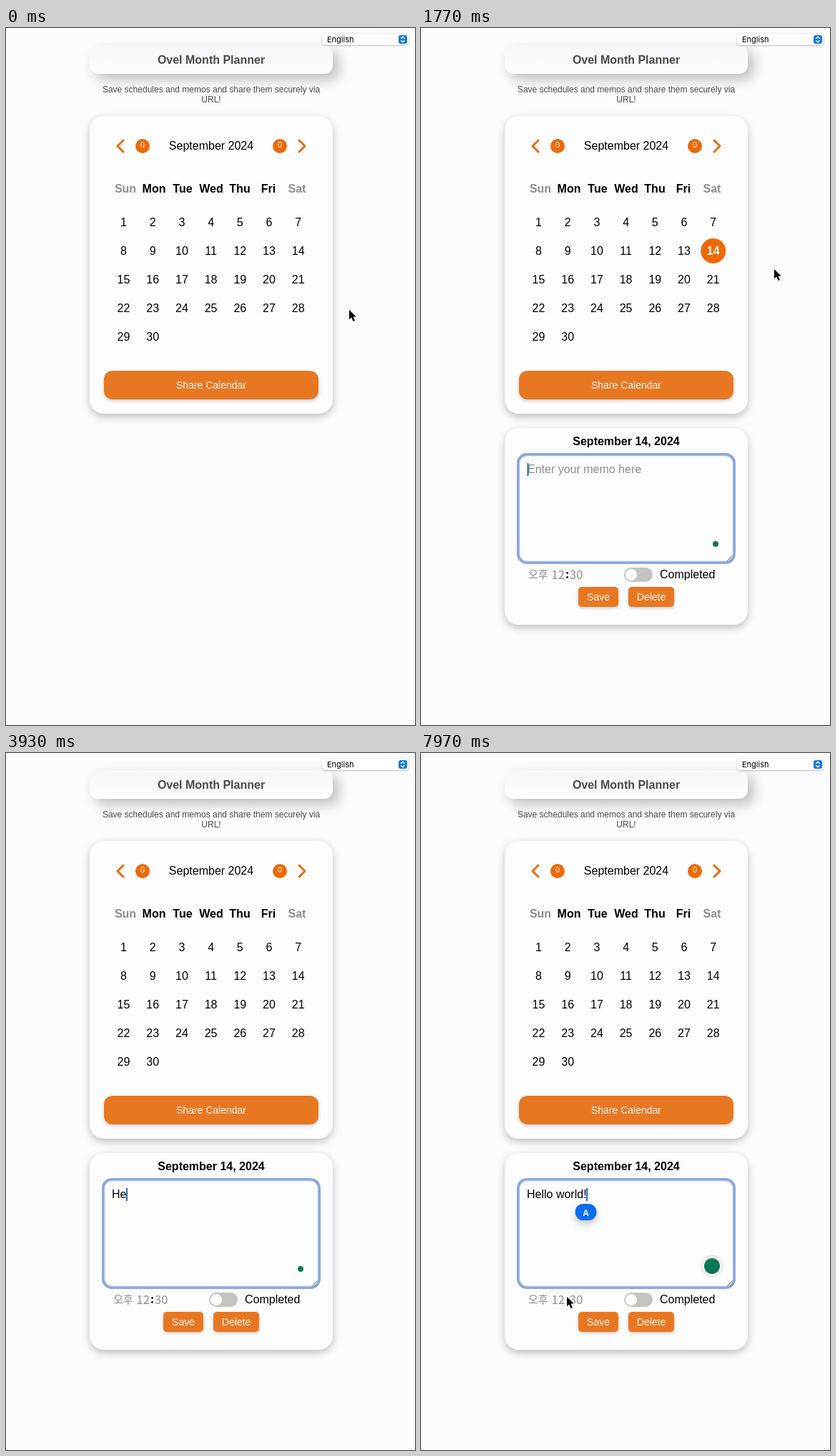
Write an HTML page with a canvas that moves like this. It is 572 by 974 pixels and loops after 8000 ms.

```html
<!DOCTYPE html>
<html lang="en">
<head>
<meta charset="utf-8">
<title>Calendar</title>
<style>
html, body { margin: 0; width: 100%; height: 100%; overflow: hidden; background: #fcfcfc; }
canvas { display: block; width: 572px; height: 974px; }
</style>
</head>
<body>
<canvas id="stage"></canvas>
<script>
const W = 572, H = 974, LOOP = 8000;
const canvas = document.getElementById('stage');
const ctx = canvas.getContext('2d');
const dpr = window.devicePixelRatio || 1;
canvas.width = W * dpr;
canvas.height = H * dpr;

const SANS = '"Liberation Sans", Arial, sans-serif';
const KR = '"Noto Sans CJK KR", "Noto Sans CJK", sans-serif';
const UI = 'Inter, sans-serif';
const C = {
  page: '#fcfcfc', card: '#fdfdfd', orange: '#e87722', vivid: '#ec6a08', cream: '#fffaf2', ink: '#000',
  title: '#4a4a46', muted: '#8e8e84', ring: '#86a8ea', blue: '#0a6cf0', green: '#087858'
};

const OPEN_AT = 1300;
const MEMO = 'Hello world!';
const KEYS = [3600, 3850, 4120, 4370, 4620, 4900, 5200, 5460, 5700, 5950, 6220, 6850];

// Pointer waypoints: time, x, y
const PATH = [
  [0, 479, 393], [120, 477, 391], [570, 391, 317], [760, 404, 312], [1350, 404, 312],
  [1720, 493, 336], [1850, 493, 336], [2280, 413, 565], [7450, 413, 565], [7930, 203, 759]
];

const clamp = v => Math.max(0, Math.min(1, v));
const ease = v => v * v * (3 - 2 * v);

function text(str, x, y, size = 16, color = C.ink, align = 'center', weight = 400, family = SANS) {
  ctx.font = `${weight} ${size}px ${family}`;
  ctx.textAlign = align;
  ctx.fillStyle = color;
  ctx.fillText(str, x, y);
}

function box(x, y, w, h, r, fill, shadow) {
  ctx.save();
  if (shadow) {
    const [dx, dy, blur, color] = shadow;
    ctx.shadowOffsetX = dx * dpr;
    ctx.shadowOffsetY = dy * dpr;
    ctx.shadowBlur = blur * dpr;
    ctx.shadowColor = color;
  }
  ctx.fillStyle = fill;
  ctx.beginPath();
  ctx.roundRect(x, y, w, h, r);
  ctx.fill();
  ctx.restore();
}

function disc(x, y, r, fill) {
  ctx.fillStyle = fill;
  ctx.beginPath();
  ctx.arc(x, y, r, 0, Math.PI * 2);
  ctx.fill();
}

function line(points, color, width) {
  ctx.strokeStyle = color;
  ctx.lineWidth = width;
  ctx.lineCap = ctx.lineJoin = 'round';
  ctx.beginPath();
  points.forEach(([x, y]) => ctx.lineTo(x, y));
  ctx.stroke();
}

function card(y, h) {
  box(117, y, 340, h, 20, C.card, [0, 4, 12, 'rgba(0,0,0,.25)']);
}

function button(label, x, y, w, h, r) {
  box(x, y, w, h, r, C.orange, [0, 2, 5, 'rgba(0,0,0,.2)']);
  text(label, x + w / 2, y + h / 2 + 5, 14, C.cream);
}

function drawHeader() {
  const sheen = ctx.createLinearGradient(0, 24, 0, 64);
  sheen.addColorStop(0, '#f7f7f8');
  sheen.addColorStop(1, '#fdfdfd');
  box(117, 24, 340, 40, 12, sheen, [8, 8, 18, 'rgba(0,0,0,.25)']);
  text('Ovel Month Planner', 287, 50, 16, C.title, 'center', 700);
  text('Save schedules and memos and share them securely via', 287, 90, 12, C.title);
  text('URL!', 287, 104, 12, C.title);

  box(442, 8, 121, 16, 4, '#fff', [0, 0.5, 2, 'rgba(0,0,0,.4)']);
  text('English', 449, 20, 11, C.ink, 'left', 400, UI);
  box(549, 10, 12, 12, 3, '#1478e6');
  line([[552.6, 14.4], [555, 12.2], [557.4, 14.4]], '#fff', 1.3);
  line([[552.6, 17.6], [555, 19.8], [557.4, 17.6]], '#fff', 1.3);
}

function drawCalendar(t) {
  card(123, 416);
  line([[164, 157], [156, 165], [164, 173]], C.vivid, 3);
  line([[410, 157], [418, 165], [410, 173]], C.vivid, 3);
  for (const x of [191, 383]) {
    disc(x, 165, 10, C.vivid);
    text('0', x, 167, 11, C.cream);
  }
  text('September 2024', 287, 170);

  ['Sun', 'Mon', 'Tue', 'Wed', 'Thu', 'Fri', 'Sat'].forEach((name, i) => {
    text(name, 167 + i * 40, 230, 16, i % 6 ? C.ink : C.muted, 'center', 700);
  });

  const glow = clamp((t - 590) / 150) * clamp((1950 - t) / 150);
  for (let day = 1; day <= 30; day++) {
    const x = 164.5 + (day - 1) % 7 * 40.7;
    const y = 277 + Math.floor((day - 1) / 7) * 40;
    const lit = day === 14 && glow > 0;
    if (lit) {
      ctx.globalAlpha = glow;
      disc(x, y - 5.5, 17.5, C.vivid);
      ctx.globalAlpha = 1;
    }
    const on = lit && glow > 0.5;
    text(day, x, y, 16, on ? C.cream : C.ink, 'center', on ? 700 : 400);
  }
  button('Share Calendar', 137, 479, 300, 40, 12);
}

function drawMemo(t) {
  card(559, 275);
  text('September 14, 2024', 287, 583, 16, C.ink, 'center', 700);

  box(134, 594, 306, 155, 14, C.ring);
  box(137.5, 597.5, 299, 148, 11, '#dcdcdc');
  box(138.5, 598.5, 297, 146, 10, C.card);
  line([[428, 745], [435, 738]], '#777', 1);
  line([[432, 745], [435, 742]], '#777', 1);

  const pressed = KEYS.filter(k => k <= t);
  const typed = MEMO.slice(0, pressed.length);
  if (typed) text(typed, 148, 622, 16, C.ink, 'left');
  else text('Enter your memo here', 149, 622, 16, C.muted, 'left');
  const caret = 149 + (typed ? ctx.measureText(typed).width - 1 : 0);
  const lastKey = pressed.pop() || OPEN_AT;
  if ((t - lastKey) % 1000 < 500) box(caret - 0.5, 608, 2, 18, 0, '#1768c8');

  drawAssistant(t);
  if ((t > 2050 && t < KEYS[0]) || t > 7550) {
    box(caret - 16, 630, 30, 23, 11.5, C.blue, [0, 5, 10, 'rgba(0,0,0,.22)']);
    text('A', caret - 1, 647, 12, '#f4f8ff', 'center', 600, UI);
  }

  text('오후', 150, 769, 15, C.muted, 'left', 400, KR);
  text('12', 182.5, 770, 16.5, C.muted, 'left', 400, KR);
  text(':', 204.5, 769, 16, C.ink, 'center', 700, KR);
  text('30', 208, 770, 16.5, C.muted, 'left', 400, KR);

  box(284, 754, 40, 20, 10, '#c4c4be');
  disc(294, 764, 8, '#fefefe');
  text('Completed', 334, 769, 16, C.ink, 'left');
  button('Save', 220, 781, 56, 28, 5);
  button('Delete', 290, 781, 64, 28, 5);
}

function drawAssistant(t) {
  const wide = (t > 2150 && t < KEYS[0]) || t > 7600;
  if (!wide) return disc(412, 721, 4, C.green);
  disc(407, 717, 15, '#d4d4d2');
  disc(407, 717, 14, '#fefefe');
  disc(407, 717, 11, C.green);
}

function pointerAt(t) {
  const i = PATH.findIndex(p => p[0] > t);
  if (i < 0) return PATH[PATH.length - 1].slice(1);
  const [t0, x0, y0] = PATH[i - 1], [t1, x1, y1] = PATH[i];
  const k = ease((t - t0) / (t1 - t0));
  return [x0 + (x1 - x0) * k, y0 + (y1 - y0) * k];
}

function outline(path, fill, stroke, width) {
  ctx.lineJoin = 'round';
  ctx.lineWidth = width;
  ctx.strokeStyle = stroke;
  ctx.fillStyle = fill;
  ctx.stroke(path);
  ctx.fill(path);
}

const ARROW = new Path2D('M1 1V14.2L4.1 11.4L6.6 17L9 16L6.6 10.5H10.7Z');
const HAND = new Path2D('M2.6 1.6C3.6.2 5 1 5.2 2.4L6.4 6.6C7.2 5.4 8.8 5.6 9 6.8C10 5.8 11.4 6.2 11.6 7.4C13 6.6 14.4 7.6 14.2 9.2C14.2 12 13.4 13.2 13 16.2H6.2C5.2 13.8 2.4 12 .8 9.8C.2 8.6 1.6 7.8 3.8 9.4L2.2 3.4C2 2.6 2.2 2.2 2.6 1.6Z');

function drawPointer(t) {
  if (t >= KEYS[0] && t < 7450) return;
  const [x, y] = pointerAt(t);
  const overDay = x > 388 && x < 428 && y > 291 && y < 332;
  const overMemo = t > OPEN_AT && x > 136 && x < 438 && y > 596 && y < 748;
  ctx.save();
  ctx.translate(x, y);
  if (overDay) {
    ctx.translate(-2.5, 0);
    outline(HAND, '#fff', '#000', 2);
    for (const fx of [7.2, 9.2, 11.2]) line([[fx, 10.6], [fx + 0.1, 13.6]], '#000', 0.9);
  } else if (overMemo) {
    line([[0, -7], [0, 7]], '#000', 1.2);
    line([[-2.5, -8], [0, -7], [2.5, -8]], '#000', 1);
    line([[-2.5, 8], [0, 7], [2.5, 8]], '#000', 1);
  } else {
    outline(ARROW, '#000', '#fff', 2);
  }
  ctx.restore();
}

function draw(t) {
  ctx.setTransform(dpr, 0, 0, dpr, 0, 0);
  ctx.fillStyle = C.page;
  ctx.fillRect(0, 0, W, H);
  drawHeader();
  drawCalendar(t);
  if (t >= OPEN_AT) drawMemo(t);
  drawPointer(t);
}

const start = performance.now();
function frame() {
  draw((performance.now() - start) % LOOP);
  requestAnimationFrame(frame);
}
frame();
</script>
</body>
</html>
```
